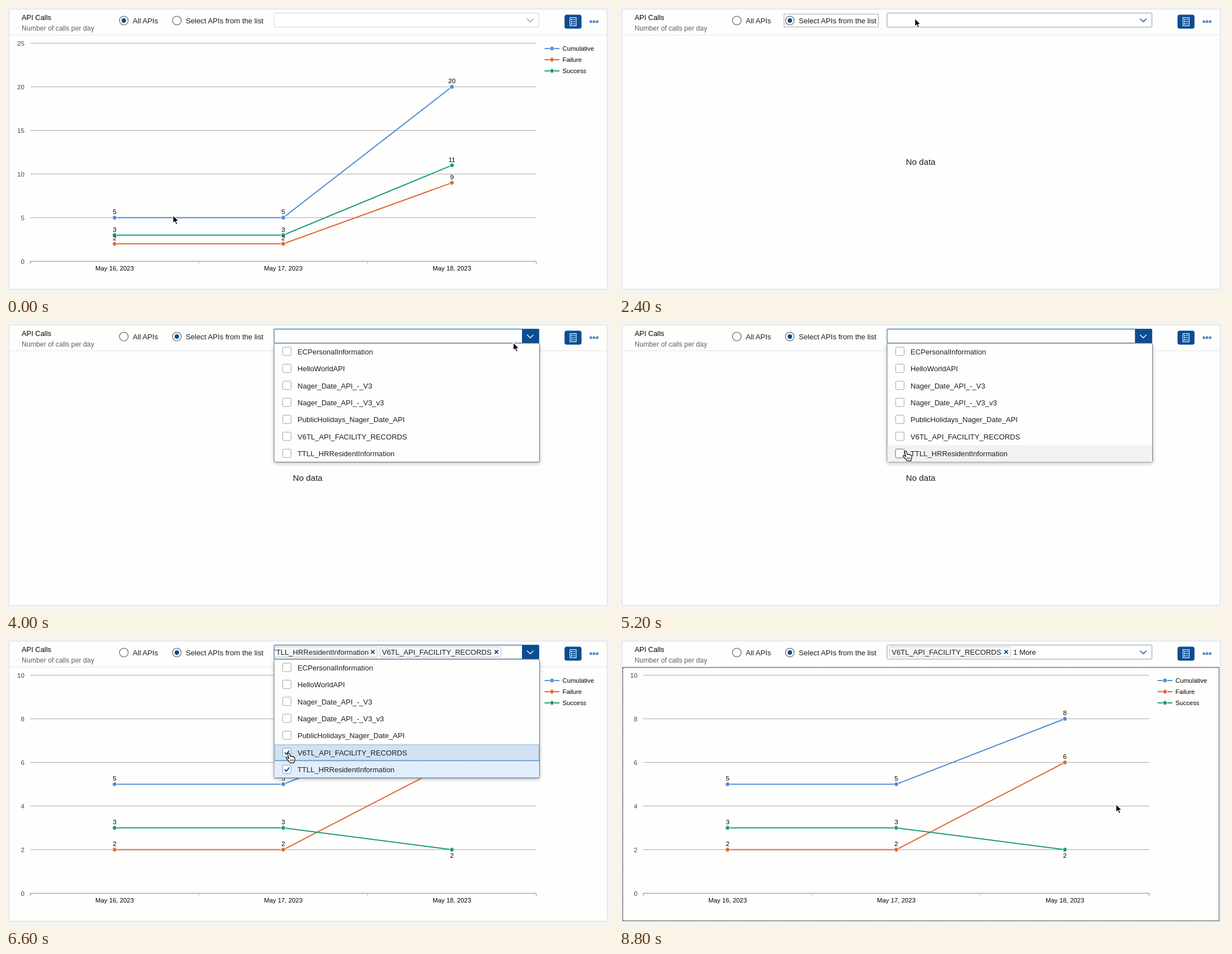
Write an HTML page that moves like this. It is 1087 by 515 pixels and loops after 9 s.

```html
<!DOCTYPE html>
<html lang="en">
<head>
<meta charset="utf-8">
<title>API Calls</title>
<style>
  html, body { margin: 0; width: 100%; height: 100%; overflow: hidden; background: #f4f4f4; }
  svg { display: block; width: 1087px; height: 515px; font-family: "Liberation Sans", Arial, sans-serif; }
  text { white-space: pre; }
</style>
</head>
<body>
<svg id="stage" viewBox="0 0 1087 515"></svg>
<script>
const LOOP = 9000, STEP = 200;
const NAVY = '#0b4d93', INK = '#1c1e20';
const BLUE = '#4f8dd4', ORANGE = '#df6838', GREEN = '#1c9d70';

const ITEMS = ['ECPersonalInformation', 'HelloWorldAPI', 'Nager_Date_API_-_V3', 'Nager_Date_API_-_V3_v3',
  'PublicHolidays_Nager_Date_API', 'V6TL_API_FACILITY_RECORDS', 'TTLL_HRResidentInformation'];
const ITEM_SIZE = 13.08, ROW = 30.4, LIST_TOP = 38;
const DAYS = ['May 16, 2023', 'May 17, 2023', 'May 18, 2023'];

const CHARTS = {
  all: { max: 25, days: DAYS, series: [[BLUE, [5, 5, 20]], [ORANGE, [2, 2, 9]], [GREEN, [3, 3, 11]]] },
  one: { max: 10, days: DAYS.slice(2), series: [[GREEN, [2]]] },
  two: { max: 10, days: DAYS, series: [[BLUE, [5, 5, 8]], [ORANGE, [2, 2, 6]], [GREEN, [3, 3, 2]]] }
};

// Each entry changes the state from its time on.
const STATES = [
  [0, { radio: 0, chart: 'all', field: 'off', tokens: '', picked: [], focusRow: -1 }],
  [1600, { radioFocus: true }],
  [1800, { radio: 1, chart: null, field: 'idle' }],
  [3400, { radioFocus: false, field: 'down', caret: true }],
  [3600, { field: 'open', caret: false }],
  [5400, { picked: [6], focusRow: 6, tokens: 'one' }],
  [5600, { chart: 'one' }],
  [6400, { picked: [5, 6], focusRow: 5, tokens: 'two', chart: 'two' }],
  [7800, { field: 'idle', tokens: 'more', chartFocus: true }]
];

// time, x, y of the pointer tip
const PATH = [
  [0, 299, 374], [400, 299, 374], [1400, 307, 23], [2000, 307, 23], [3000, 940, 21],
  [3800, 940, 21], [5000, 513, 231], [5400, 513, 231], [5800, 506, 206],
  [6800, 506, 206], [7600, 890, 297], [9000, 890, 297]
];

const ease = u => u * u * (3 - 2 * u);

function pointerAt(t) {
  let i = 0;
  while (i < PATH.length - 2 && t >= PATH[i + 1][0]) i++;
  const [t0, x0, y0] = PATH[i], [t1, x1, y1] = PATH[i + 1];
  const u = ease((t - t0) / (t1 - t0));
  return { x: x0 + (x1 - x0) * u, y: y0 + (y1 - y0) * u };
}

const stateAt = t => Object.assign({}, ...STATES.filter(s => s[0] <= t).map(s => s[1]));

const text = (x, mid, size, str, fill = INK, anchor = 'start') =>
  `<text x="${x}" y="${mid + size * 0.36}" font-size="${size}" fill="${fill}" text-anchor="${anchor}">${str}</text>`;
const rect = (x, y, w, h, attrs) => `<rect x="${x}" y="${y}" width="${w}" height="${h}" ${attrs}/>`;
const path = (d, stroke, width = 1, attrs = '') =>
  `<path d="${d}" fill="none" stroke="${stroke}" stroke-width="${width}" ${attrs}/>`;
const dot = (x, y, r, attrs) => `<circle cx="${x}" cy="${y}" r="${r}" ${attrs}/>`;
const marker = (x, y, color) => dot(x, y, 3.9, `fill="${color}" stroke="#fefefd" stroke-width="1"`);

function frame() {
  let s = rect(0, 0, 1087, 515, 'fill="#f4f4f4"')
    + rect(5.5, 5.5, 1071, 501, 'fill="#fefefd" stroke="#dadada"')
    + path('M6 51.5H1076', '#e2e2e2')
    + text(28, 20.5, 12.9, 'API Calls', '#000')
    + text(28, 39.7, 12.3, 'Number of calls per day', '#5c5f62')
    + rect(1000.2, 15.5, 30.4, 25, `rx="4" fill="${NAVY}"`)
    + rect(1010, 20.8, 11, 14.5, 'fill="none" stroke="#fff" stroke-width="1.2"');
  for (const y of [24.3, 28, 31.8])
    s += rect(1012, y - 1, 2.2, 2.2, 'fill="#fff"') + path(`M1015.6 ${y}h3.6`, '#fff', 1.2);
  for (const x of [1047.4, 1053, 1058.6])
    s += dot(x, 28, 1.6, `fill="none" stroke="${NAVY}" stroke-width="1.3"`);
  return s;
}

function radios(st, hover) {
  return [[211, 227, 'All APIs'], [306, 322, 'Select APIs from the list']].map(([cx, tx, label], i) =>
    dot(cx, 26, 7.8, `fill="#fff" stroke="${i === hover ? NAVY : '#55585b'}" stroke-width="1.1"`)
    + (i === st.radio ? dot(cx, 26, 4, `fill="${NAVY}"`) : '')
    + text(tx, 26.5, 13.17, label)).join('')
    + (st.radioFocus ? rect(295.5, 14.5, 169, 23, 'fill="none" stroke="#555" stroke-dasharray="1 1"') : '');
}

function token(x, w, label) {
  const cx = x + w - 8.7;
  return rect(x + .5, 15.5, w - 1, 18.5, 'rx="3" fill="#f7f7f7" stroke="#c6c6c6"')
    + text(x + 4.3, 24.8, ITEM_SIZE, label)
    + path(`M${cx - 3.2} 21.6l6.4 6.4m0-6.4l-6.4 6.4`, NAVY, 1.9);
}

function field(st, hover) {
  const active = st.field === 'down' || st.field === 'open';
  const edge = active ? '#2b6ea8' : st.field === 'off' ? '#d3d3d3' : '#929496';
  let s = rect(480, 12.6, 474.3, 25.2, `rx="1.5" fill="#fff" stroke="${edge}" stroke-width="${active ? 1.2 : 1}"`);
  if (st.field === 'down') s += rect(481.5, 13.9, 442, 22.6, 'fill="none" stroke="#a9bdcc" stroke-width=".8"');
  if (active) s += rect(924, 13, 30.3, 24.6, `fill="${NAVY}"`);
  else if (hover) s += rect(924, 13, 30, 24.2, 'fill="#e9f2fa"');
  const chevron = active ? '#fff' : st.field === 'off' ? '#7f9fc4' : NAVY;
  s += path('M933 22.7l5.8 5.6l5.8-5.6', chevron, 1.35);
  if (st.caret) s += path('M488.5 17V33', '#777');

  const [facility, resident] = ITEMS.slice(5);
  if (st.tokens === 'one') s += token(484, 194, resident);
  if (st.tokens === 'two')
    s += `<g clip-path="url(#field)">${token(471.5, 194, resident)}${token(669, 218, facility)}</g>`;
  if (st.tokens === 'more') s += token(484, 218, facility) + text(706, 25, ITEM_SIZE, '1 More');
  return s;
}

function list(st, hover, overBox) {
  let s = rect(480, LIST_TOP, 475.5, 212.5, 'rx="2.5" fill="#fefefd" stroke="#68727d" filter="url(#shadow)"');
  ITEMS.forEach((label, i) => {
    const y = LIST_TOP + i * ROW, mid = y + 14.9;
    const on = st.picked.includes(i), hot = i === hover;
    const fill = on ? (hot ? '#d1e2f2' : '#e1edfa') : hot ? '#f2f2f2' : '';
    if (fill) s += rect(480.5, y, 474.5, ROW - .4, `fill="${fill}"`);
    if (on) s += path(`M480.5 ${y + ROW - .6}H955`, '#3d74ab');
    if (i === st.focusRow)
      s += rect(481.5, y + 1, 472.5, ROW - 2.8, 'fill="none" stroke="#5484b2" stroke-dasharray="1 1"');
    const boxHot = hot && overBox;
    if (boxHot && !on) s += rect(494.5, mid - 9, 17.5, 17.5, 'rx="2.5" fill="none" stroke="#c9c9c9"');
    s += rect(495.5, mid - 7.9, 15, 15, `rx="2" fill="#fff" stroke="${on ? '#7d97b3' : boxHot ? '#8b8e91' : '#a2a4a6'}"`);
    if (on) s += path(`M498.9 ${mid - .3}l3 3.2l5.4-6.6`, NAVY, 1.9);
    s += text(522, mid + .2, ITEM_SIZE, label);
  });
  return s;
}

function chart({ max, days, series }) {
  const L = 43.5, R = 949.5, BASE = 456.5, H = 390;
  const slot = (R - L) / days.length;
  const px = i => L + slot * (i + .5), py = v => BASE - v / max * H;
  let s = '';
  for (let i = 0; i <= 5; i++) {
    const y = BASE - i * H / 5;
    if (i) s += path(`M${L} ${y}H${R}`, '#a9aaae');
    s += text(33, y, 11.7, max / 5 * i, '#44474a', 'end');
  }
  s += path(`M${L} 461V${BASE}H${R}V461`, '#85878b');
  days.forEach((day, i) => {
    if (i) s += path(`M${Math.round(L + slot * i) - .5} 457v4`, '#b5b6b9');
    s += text(px(i), 469.3, 11.4, day, '#000', 'middle');
  });
  let labels = '';
  for (const [color, values] of series) {
    s += path('M' + values.map((v, i) => `${px(i)} ${py(v)}`).join('L'), color, 2, 'stroke-linejoin="round"');
    values.forEach((v, i) => {
      s += marker(px(i), py(v), color);
      const below = i > 0 && v < values[i - 1];
      labels += text(px(i), py(v) + (below ? 10.4 : -10.3), 11.7, v, '#000', 'middle');
    });
  }
  [[BLUE, 'Cumulative'], [ORANGE, 'Failure'], [GREEN, 'Success']].forEach(([color, name], i) => {
    const y = 76 + 20 * i;
    s += path(`M964.5 ${y}H991`, color, 2) + marker(977.7, y, color) + text(996.5, y + .2, 11.3, name, '#000');
  });
  return s + labels;
}

function pointer({ x, y }, hand) {
  const at = `<g transform="translate(${x.toFixed(2)} ${y.toFixed(2)})" stroke-linejoin="round">`;
  if (!hand)
    return at + '<path d="M0 0V14.5L3.3 11.4L5.6 16.8L8.1 15.7L5.8 10.5H10.4Z" fill="#000" stroke="#fff" stroke-width="1.2"/></g>';
  return at + '<path d="M-1.6 1C-1.2-.7 1.2-.8 1.8 1L3.6 6.1C4 4.9 6 5 6.4 6.4C7 5.5 8.7 5.8 9 7.1'
    + 'C9.8 6.6 11 7.2 11.1 8.6L11.2 12C11 14.2 10 14.6 9.8 17.3H2.6C2 15-1 13-3.8 9.8'
    + 'C-4.9 8.4-3.4 7.1-2 8.1L.7 9.6Z" fill="#fff" stroke="#000" stroke-width="1.15"/>'
    + path('M3.6 11.2v3.3M5.8 11v3.4M8 11v3.3', '#000', .9) + '</g>';
}

const DEFS = '<defs><clipPath id="field"><rect x="481" y="13" width="442" height="24"/></clipPath>'
  + '<filter id="shadow" x="-5%" y="-5%" width="110%" height="115%">'
  + '<feDropShadow dx="0" dy="2" stdDeviation="3" flood-color="#000" flood-opacity=".25"/></filter></defs>';

function draw(t) {
  const st = stateAt(t), p = pointerAt(t);
  const inside = (x, y, w, h) => p.x >= x && p.x < x + w && p.y >= y && p.y < y + h;
  const open = st.field === 'open';
  const overList = open && inside(480, LIST_TOP, 475, ITEMS.length * ROW);
  const overButton = st.field !== 'off' && inside(924, 13, 30, 25);
  const radio = inside(203, 15, 70, 22) ? 0 : inside(296, 15, 168, 22) ? 1 : -1;
  const row = overList ? Math.floor((p.y - LIST_TOP) / ROW) : -1;

  let s = DEFS + frame();
  s += st.chart ? chart(CHARTS[st.chart]) : text(540.3, 279, 15.1, 'No data', INK, 'middle');
  if (st.chartFocus)
    s += rect(6.7, 52.7, 1067.8, 452.8, 'fill="none" stroke="#111" stroke-width="1.5" stroke-dasharray="1.5 1.5"');
  s += radios(st, radio) + field(st, overButton);
  if (open) s += list(st, row, p.x < 516);
  s += pointer(p, overList || overButton || radio >= 0);
  stage.innerHTML = s;
}

const stage = document.getElementById('stage');
const start = performance.now();
let shown = -1;

function tick(now) {
  const t = Math.floor(Math.max(0, now - start) % LOOP / STEP) * STEP;
  if (t !== shown) draw(shown = t);
  requestAnimationFrame(tick);
}
draw(0);
requestAnimationFrame(tick);
</script>
</body>
</html>
```
